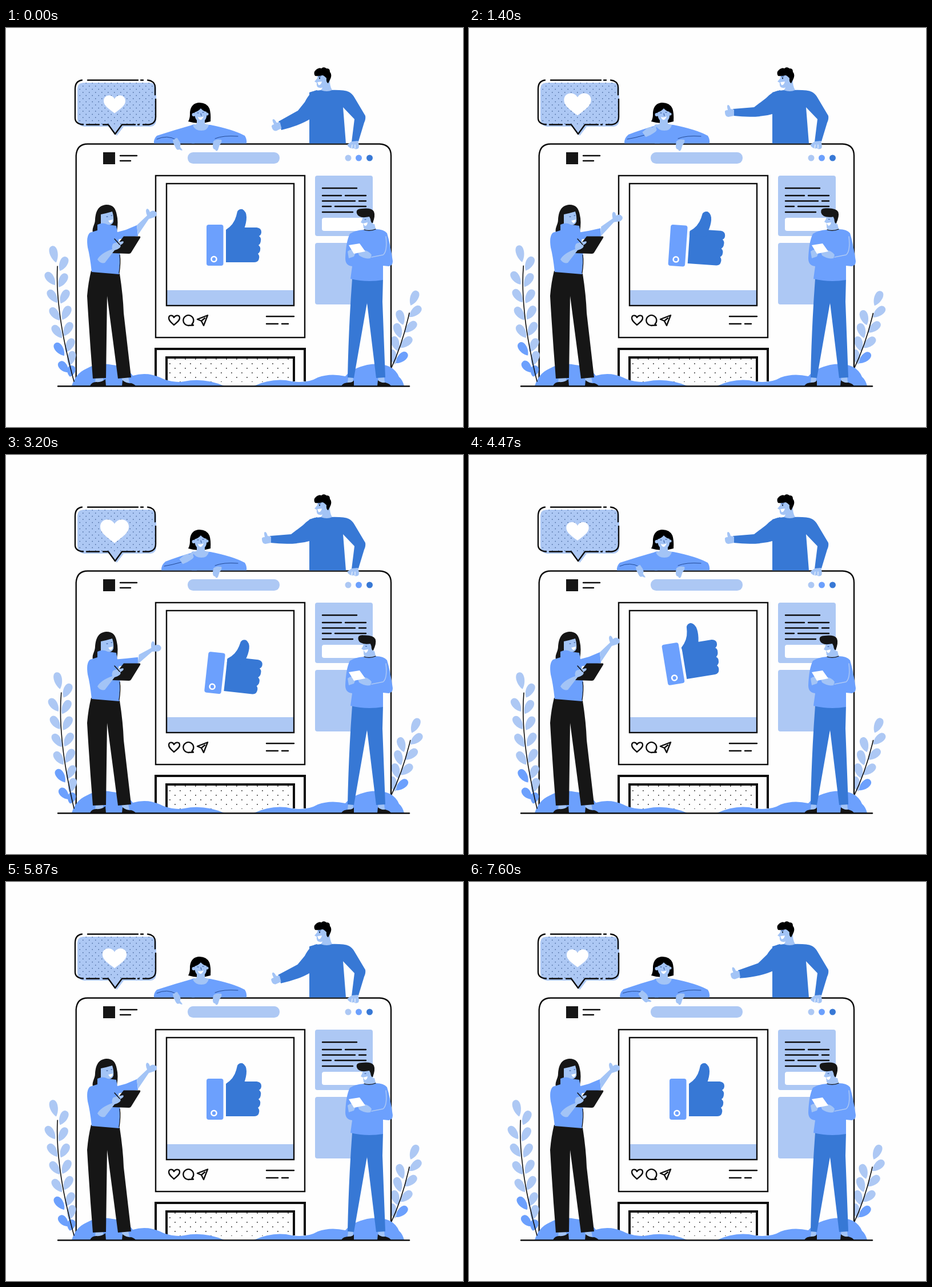
An HTML page that plays this animation: 800x700 px, repeating every 7660 ms.

```html
<!DOCTYPE html>
<html lang="en">
<head>
<meta charset="utf-8">
<title>Social feed</title>
<style>
html, body { margin: 0; width: 100%; height: 100%; overflow: hidden; background: #fefefe; }
svg { display: block; width: 800px; height: 700px; }
.l { fill: #adc8f4; }
.m { fill: #6ca0fd; }
.d { fill: #3778d5; }
.k { fill: #161616; }
.w { fill: #fff; }
.s { fill: #a3c4f6; }
.o { fill: none; stroke: #0c0c0c; stroke-width: 2.4; stroke-linecap: round; stroke-linejoin: round; }
.t { fill: none; stroke: #234a94; stroke-width: 1; stroke-linecap: round; }
</style>
</head>
<body>
<svg viewBox="0 0 800 700">
<defs>
  <pattern id="dots" width="11" height="11" patternUnits="userSpaceOnUse"><path d="M2 3h1.5M7.5 8.5h1.5" stroke="#46669c" stroke-width="1.5"/></pattern>
  <pattern id="wide" x="3" y="2" width="18" height="16" patternUnits="userSpaceOnUse"><path d="M4 3h1.8M13 11h1.8" stroke="#222" stroke-width="1.7"/></pattern>
</defs>

<g id="plantR"></g>

<!-- speech bubble -->
<path class="l" d="M137 96H251Q263 96 263 107V161Q263 173 251 173H206L194 189L182 173H137Q125 172 125 160V107Q125 96 137 96Z"/>
<path fill="url(#dots)" d="M137 96H251Q261 96 261 107V160Q261 170 251 170H137Q125 170 125 160V107Q125 96 137 96Z"/>
<path class="o" d="M143 91.5H231M236 91.5H240M248 91.5Q261 93 261 104V117M262 125V156Q262 168 250 169.500H240M233 169.500H231M226 169.500H203L191 186L179 169.500H170M163 169.500H141M135 169.500Q121 168 121 158V107Q121 93 133 91.5"/>
<path id="heart" class="w" d="M0 15.5C-10 8 -19 2 -19 -6C-19 -17 -5 -19 0 -10C5 -19 19 -17 19 -6C19 2 10 8 0 15.5Z"/>

<!-- browser window -->
<path d="M122.700 617V224Q124 203.500 143 203.500H654Q674 204.500 674 224V617" class="o" style="fill:#fefefe"/>

<!-- woman behind the window -->
<path class="m" d="M325 170Q340 168 358 170Q398 178 418 189Q422 195 421 202.500H325Z"/>
<path id="sleeve" class="m"/>
<path id="crease" class="t"/>
<path class="t" d="M406 190Q380 188 366 194"/>
<path fill="#000" d="M339 131C326 131 322 141 322 151Q322 159 319 164Q332 168 345 167L358 164Q359 149 356 141Q351 131 339 131Z"/>
<path class="s" d="M334 158H348V168L355 170Q353 180 342 180Q331 180 327 171L334 168Z"/>
<path class="s" d="M330 148Q337 146 341 141Q345 146 351 147Q353 164 341 165Q330 164 330 148Z"/>
<circle class="s" cx="328.5" cy="152" r="3"/><circle class="s" cx="352" cy="151" r="2.5"/>
<path class="w" d="M336 156Q341 158 346 155Q343 162 340 161Q337 160 336 156Z"/>
<path class="t" d="M335 149h2M344 148h2M341 150l1 4"/>
<path class="s" d="M363 199Q367 194 377 196Q379 200 374 205L371 214Q368 218 366 213Q360 213 363 199Z"/>
<path id="chinHand" class="s" d="M-4 -5L7 -7Q15 -7 17 -3L26 -5Q28 -3 22 1Q23 7 13 7Q5 8 -3 6Z"/>

<!-- man behind the window -->
<path id="manArm" class="d"/>
<path class="d" d="M531 113Q546 108 565 109Q592 108 600 112Q606 115 610 122L629 154Q630 160 627 166L617 199L605 200L610 160L590 139L595 202.500H531Z"/>
<path class="s" d="M605 199L616 198Q619 207 617 211Q612 214 609 211Q602 213 597 205Z"/>
<path class="t" d="M606 205l-1 6M611 205l0 6" style="stroke:#fff"/>
<path class="s" d="M551 99L567 88Q566 101 571 109Q562 113 551 109L554 105Z"/>
<path class="s" d="M546 79L565 78Q568 95 560 102Q552 107 546 104Q543 101 544 96L540 94L545 88Z"/>
<path fill="#000" d="M541 84Q537 78 543 73Q548 69 552 71Q556 67 561 71Q567 70 567 77Q571 82 568 89L564 97Q560 95 561 88Q556 83 554 83Q547 85 541 84Z"/>
<path class="w" d="M545 95L553 94Q551 101 547 100Z"/>
<ellipse id="eye" cx="549" cy="88" rx="1" ry="1.5" fill="#123"/>
<path class="t" d="M547 85.5l4 -.5"/>
<path id="manHand" class="s" d="M3 -5L-3 -6Q-5 -14 -8 -13Q-10 -12 -8 -4Q-14 -4 -13 0Q-13 7 -7 8L3 6Z"/>

<!-- header -->
<rect class="k" x="170" y="218" width="21" height="21"/>
<path class="o" d="M200 224H229M200 233H218"/>
<rect class="l" x="318" y="218" width="161" height="20" rx="9.5"/>
<circle class="l" cx="599" cy="228" r="5.5"/><circle class="m" cx="617.5" cy="228" r="5.5"/><circle class="d" cx="636.5" cy="228" r="5.5"/>

<!-- post -->
<g class="o" style="stroke-linejoin:miter">
  <rect x="262" y="259" width="261" height="284"/>
  <rect class="l" x="282" y="460" width="221" height="26" stroke="none"/>
  <rect x="281" y="273" width="223" height="214"/>
</g>
<path class="o" d="M294 521C288 516 285 513 285 509C285 503 292 503 294 508C297 503 304 503 304 509C304 513 300 516 294 521ZM325.5 519.5A9 9 0 1 0 321 521.8L328 521.5ZM335 511L353 504L346 522L342 514ZM342 514L348 509M456 506H504M456 519H476M483 519H494"/>
<path d="M262 620V563H523V620" class="o" style="stroke-width:4;stroke-linecap:butt;stroke-linejoin:miter"/>
<rect x="282" y="580" width="221" height="41" fill="url(#wide)"/>
<path d="M281 620V578H504V620" class="o" style="stroke-width:4;stroke-linecap:butt;stroke-linejoin:miter"/>

<!-- thumb icon -->
<g id="thumbs">
  <rect class="m" x="351" y="345" width="29.5" height="72" rx="4"/>
  <circle cx="364" cy="405.5" r="4.5" fill="none" stroke="#fff" stroke-width="2.6"/>
  <path class="d" d="M385 355L405 350H439Q447 351 447 358Q447 363 443 365Q447 368 446 373Q446 378 442 381Q446 384 445 389Q445 393 441 396Q444 399 443 404Q442 411 435 411H385Z"/>
  <path id="thumb" class="d" d="M385 362V354Q399 345 403 330L405 322Q408 317 414 318Q421 322 421 332Q421 341 417 352L414 362Z"/>
</g>

<!-- sidebar -->
<rect class="l" x="541" y="259" width="101" height="106" rx="4"/>
<rect class="l" x="541" y="377" width="101" height="108" rx="4"/>
<path class="o" d="M554 281H614M554 294H587M594 294H630M554 303.5H611M618 303.5H630M554 313H569M576 313H630M554 323H607"/>
<rect class="w" x="553" y="333" width="80" height="23" rx="4"/>

<!-- bushes -->
<path class="m" d="M115 628Q122 606 140 598Q160 586 186 591Q210 593 222 610Q250 602 276 616Q296 623 312 620Q346 613 382 628ZM434 628Q462 615 490 618Q524 626 546 613Q568 605 594 611Q606 597 632 591Q676 584 688 612Q694 617 697 628Z"/>
<g id="plantL"></g>

<!-- woman with clipboard -->
<path class="s" d="M157 612H170V622H156ZM202 612H214L216 622H205Z"/>
<path class="k" d="M147 628Q150 621 158 621Q168 622 174 616L175 628ZM203 628L204 618Q211 624 219 623Q225 625 227 628Z"/>
<path class="k" d="M149 426L199 431Q205 470 206 500L219 613L196 615L177 470L175 614L152 615Q146 540 142 470Q144 446 149 426Z"/>
<path class="k" d="M176 310C160 311 157 324 156 336C156 345 150 350 152 359L166 360L194 357Q197 340 194 328C192 316 187 310 176 310Z"/>
<path class="s" d="M166 327Q176 325 186 322Q189 331 188 340Q185 347 177 346L166 343Z"/>
<path class="w" d="M179 338L187 336Q186 343 182 342Z"/>
<path class="t" d="M176 331h2M184 329h1.5"/>
<path id="wSleeve" class="m"/>
<g id="forearm">
  <path class="s" d="M229 346L247 329Q243 319 247 317Q250 317 252 323Q258 318 263 323Q266 328 260 332L250 335L231 363Z"/>
</g>
<path class="m" d="M160 345Q170 340 178 345L193 347L195 358Q199 363 197 375L200 400L198 432L150 428Q147 400 143 385Q140 365 147 359L160 355Z"/>
<path class="o" d="M199 398Q201 410 198 430" style="stroke-width:1.2"/>
<path class="k" d="M206 365.5H234Q236 366 235 368L219 394Q218 396 215 396L186 395Q184 394 185 392Z"/>
<path class="s" d="M160 406Q166 395 186 388Q184 378 191 377L205 374Q208 377 200 381Q203 386 190 390L173 412Q165 414 160 406Z"/>
<path class="t" d="M190 370L199 380" style="stroke:#111;stroke-width:1.5"/>

<!-- man with phone -->
<path class="s" d="M599 612H608L607 622H598ZM651 612H662L663 622H652Z"/>
<path class="k" d="M587 628Q590 622 600 622Q607 622 609 618V628ZM650 628L651 618Q656 623 664 622Q672 624 674 628Z"/>
<path class="d" d="M606 440H660L659 480L664 613L648 614L632 482L609 614L598 613Q600 520 606 440Z"/>
<path class="s" d="M627 344H645L648 356Q637 359 627 355Z"/>
<g id="head">
  <path class="s" d="M623 329L642 326Q645 342 640 348Q634 355 626 351L625 343L621 341L624 335Z"/>
  <path class="k" d="M614 325Q612 317 623 317Q640 315 644 322Q647 329 642 342Q639 343 638 335L636 331Q617 335 614 325Z"/>
  <path class="w" d="M625 343L633 341Q632 348 628 347Z"/>
  <path class="t" d="M628 336h2"/>
</g>
<path class="m" d="M626 354Q637 357 648 353Q661 353 667 360Q673 380 677 409Q677 417 670 418L660 417V442Q632 447 603 440L606 418Q594 417 594 404Q595 375 602 361Q611 355 626 354Z"/>
<path class="o" d="M627 354Q637 357 647 353" style="stroke-width:1.3"/>
<path class="t" d="M665 366Q668 392 660 398L640 402" style="stroke:#adc8f4;stroke-width:1.5"/>
<path class="s" d="M598 392Q604 386 613 392L609 401L600 404ZM616 393L626 390Q634 390 640 398L638 404Q628 406 618 399Z"/>
<path class="w" d="M600 381L619 378L629 392L609 396Z"/>

<path class="o" d="M91 628.5H706"/>
</svg>
<script>
const $ = id => document.getElementById(id);
const PERIOD = 1915;

// Eased value at p through pairs of time and value.
function key(p, ...k) {
  if (p <= k[0]) return k[1];
  for (let i = 2; i < k.length; i += 2) {
    if (p <= k[i]) {
      const u = (p - k[i - 2]) / (k[i] - k[i - 2]);
      return k[i - 1] + (k[i + 1] - k[i - 1]) * u * u * (3 - 2 * u);
    }
  }
  return k[k.length - 1];
}

// Blend two paths of the same structure.
function blend(a, b, s) {
  const to = b.match(/-?[\d.]+/g);
  let i = 0;
  return a.replace(/-?[\d.]+/g, n => +n + (to[i++] - n) * s);
}

const leaf = (x, y, turn, tone = 'l', len = 13.5) =>
  `<path class="${tone}" transform="translate(${x} ${y}) rotate(${turn})" d="M0 ${len}C-9 5 -10 ${-len} 0 ${-len}C10 ${-len} 9 5 0 ${len}Z"/>`;

const stem = d => `<path class="o" style="stroke-width:1.6" d="${d}"/>`;

let left = leaf(84, 397, -14, 'l', 15) + leaf(100, 414, 25);
for (let i = 0; i < 5; i++) {
  left += leaf(78 + 4 * i, 440 + 31 * i, -36, i == 4 ? 'm' : 'l');
  left += leaf(99 + 3 * i, 443 + 28.5 * i, 28);
}
left += leaf(101, 595, -40, 'm', 12) + leaf(114, 580, 16) + leaf(114, 602, 12, 'm', 10);
$('plantL').innerHTML = left + stem('M119 620Q100 550 94 500Q88 455 90 418');

let right = leaf(714, 474, 24, 'l', 14);
for (let i = 0; i < 4; i++) {
  right += leaf(716 - 8 * i, 498 + 27 * i, 48, i == 3 ? 'm' : 'l');
  right += leaf(691 - 4.5 * i, 508 + 23 * i, -18);
}
$('plantR').innerHTML = right + stem('M673 600Q694 555 706 500');

const place = (id, value) => $(id).setAttribute('transform', value);
const shape = (id, a, b, s) => $(id).setAttribute('d', blend(a, b, s));

function draw(now) {
  const p = now % PERIOD / PERIOD;

  const sway = (1 - Math.cos(2 * Math.PI * (p - .02))) / 2;
  place('plantL', `rotate(${2.4 * sway} 119 622)`);
  place('plantR', `rotate(${1.3 * sway} 674 600)`);

  const beat = key(p * 2 % 1, 0, 1, .33, 1.32, .76, 1);
  place('heart', `translate(190 134) scale(${beat})`);

  // Anticipate, leap, land with an overshoot and settle.
  const jump = key(p, .12, 0, .29, 1, .4, -.09, .62, 0);
  const tilt = key(p, .12, 0, .3, -16.5, .4, 9.5, .52, 9.5, .9, 0);
  place('thumbs', `translate(${-14 * jump} ${-21 * jump}) rotate(${tilt} 355 379)`);
  place('thumb', `rotate(${key(p, .12, 0, .3, -9, .62, 0)} 392 358)`);

  const lean = key(p, .34, 0, .46, 1, .93, 1, 1, 0);
  shape('sleeve', 'M330 169Q298 178 264 189Q258 195 259 202.5L330 202.5Z',
    'M334 169Q302 178 279 187Q271 194 272 202.5L334 202.5Z', lean);
  shape('crease', 'M264 195Q282 187 298 196', 'M277 195Q290 193 307 188', lean);
  const lift = lean * lean;
  place('chinHand', `translate(${297 + 12 * lean} ${197 - 12 * lift}) rotate(${66 - 96 * lift}) scale(${.78 + .16 * lean})`);

  const raise = key(p, .04, 0, .24, 1, .93, 1, 1, 0);
  shape('manArm', 'M545 109Q533 110 523 130L511 145L477 164L482 179Q515 171 535 158Z',
    'M545 109Q531 111 520 123L499 139L462 142L463 154Q506 159 535 150Z', raise);
  place('manHand', `translate(${478 - 17 * raise} ${171 - 23 * raise}) rotate(${-14 + 14 * raise})`);
  const blink = Math.abs(p - .2) < .025 || Math.abs(p - .8) < .025;
  $('eye').setAttribute('ry', blink ? .4 : 1.5);

  const drop = key(p, .42, 0, .58, 1, .66, 1, .82, 0);
  shape('wSleeve', 'M188 360L210 354L229 346L231 365L195 371Z',
    'M188 359L210 357L231 355L231 366L195 371Z', drop);
  place('forearm', `translate(0 ${2 * drop}) rotate(${15 * drop} 222 361)`);

  place('head', `rotate(${key(p, .42, 0, .58, 5, .66, 5, 1, 0)} 634 353)`);

  requestAnimationFrame(() => draw(performance.now()));
}
draw(performance.now());
</script>
</body>
</html>
```
